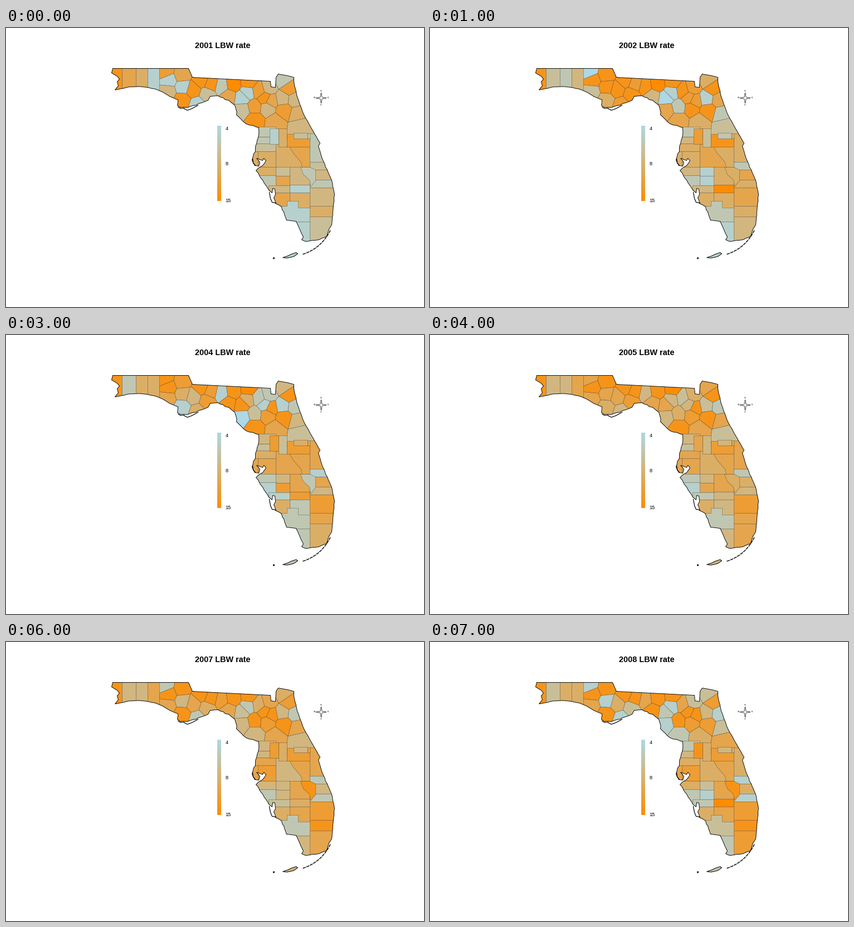
A matplotlib script for the animation above (8000 ms loop, 750x500 px).

```python
import numpy as np
import matplotlib.pyplot as plt
from matplotlib.animation import FuncAnimation
from matplotlib.collections import PolyCollection
from matplotlib.colors import LinearSegmentedColormap
from matplotlib.patches import PathPatch, Polygon
from matplotlib.path import Path

W, H, DPI = 750, 500, 100
FIRST_YEAR, YEARS = 2001, 8
SURVEYS = [0, 1, 2, 3, 5, 7]  # years with a given rate, the others lie between
RAMP = LinearSegmentedColormap.from_list("rate", ["#ADD8E6", "#FF8C00"])
STEPS = RAMP(np.linspace(0, 1, 10))
rng = np.random.default_rng(4)

fig = plt.figure(figsize=(W / DPI, H / DPI), dpi=DPI, facecolor="white")
ax = fig.add_axes([0, 0, 1, 1])
ax.axis("off")


def pt(px):
    return px * 72 / DPI


def label(x, y, text, size, **kw):
    return ax.text(x, y, text, fontsize=pt(size), family="Liberation Sans", **kw)


def stroke(points, width=1.0, **kw):
    ax.plot(*np.transpose(points), color="black", lw=pt(width), **kw)


def coast(points, wiggle):
    """Key points joined by lines with a little seeded roughness."""
    points = np.array(points, float)
    parts = []
    for a, b in zip(points, points[1:]):
        n = max(1, int(np.hypot(*(b - a)) / 5))
        part = a + (b - a) * np.arange(n)[:, None] / n
        part[1:] += rng.normal(0, wiggle, (n - 1, 2))
        parts.append(part)
    return np.vstack(parts)


# State outline, clockwise from the north-west corner
BORDER = [(191, 72), (327, 72), (334, 88), (474, 95), (475, 105), (483, 106),
          (484, 88), (488, 82), (505, 85), (516, 88), (516, 96)]
ATLANTIC = [(516, 96), (518, 106), (522, 123), (533, 153), (553, 189),
            (563, 206), (560, 211), (567, 234), (584, 273), (589, 298),
            (585, 340), (584, 352), (579, 360), (575, 373), (561, 379),
            (537, 382), (530, 379), (533, 374), (520, 346), (503, 344)]
GULF = [(503, 344), (494, 320), (483, 314), (480, 304), (483, 298), (482, 288),
        (478, 287), (477, 295), (471, 290), (448, 255), (453, 250), (460, 246),
        (466, 237), (462, 233), (460, 237), (449, 233), (455, 241), (453, 247),
        (446, 246), (441, 236), (452, 196), (453, 178), (430, 171), (413, 155),
        (410, 138), (399, 129), (380, 121), (366, 122), (362, 129), (340, 138),
        (325, 142), (312, 142), (307, 138), (308, 128)]
BEACH = [(308, 128), (293, 122), (280, 114), (268, 109), (254, 106), (240, 104.5),
         (222, 105), (195, 110.5), (201, 103), (199, 96), (203, 91), (199, 86),
         (189, 80), (191, 72)]
outline = np.vstack([coast(BORDER, 0), coast(ATLANTIC, 0.2), coast(GULF, 0.6),
                     coast(BEACH, 0.2)])
mainland = Path(np.vstack([outline, outline[:1]]))

shapes, rates = [], []


def county(steps, points):
    """Add one county; steps holds a colour step (0-9) per survey."""
    shapes.append(np.array(points, float))
    known = [int(d) for d in steps]
    rates.append(np.rint(np.interp(range(YEARS), SURVEYS, known)).astype(int))


def rect(steps, x0, y0, x1, y1):
    county(steps, [(x0, y0), (x1, y0), (x1, y1), (x0, y1)])


def row(y0, y1, edges, *steps):
    for s, x0, x1 in zip(steps, edges, edges[1:]):
        rect(s, x0, y0, x1, y1)


def column(x0, x1, edges, *steps):
    for s, y0, y1 in zip(steps, edges, edges[1:]):
        rect(s, x0, y0, x1, y1)


def nearest_area(seed, others):
    """The part of the north that lies closer to seed than to the others."""
    area = [np.array(p) for p in ((270, 60), (600, 60), (600, 200), (270, 200))]
    for other in others:
        normal, middle = other - seed, (other + seed) / 2
        kept = []
        for a, b in zip(area, area[1:] + area[:1]):
            da, db = (a - middle) @ normal, (b - middle) @ normal
            if da <= 0:
                kept.append(a)
            if da * db < 0:
                kept.append(a + (b - a) * da / (da - db))
        area = kept
    return area


# Northern counties grow around their centres
NORTH = [
    (286, 78, "708841"), (292, 93, "188888"), (290, 113, "437656"),
    (315, 84, "688788"), (317, 105, "188571"), (316, 128, "851198"),
    (335, 110, "888475"), (343, 137, "178521"), (350, 93, "888888"),
    (361, 118, "388773"), (368, 100, "876788"), (386, 104, "281186"),
    (407, 101, "998888"), (399, 121, "642858"), (435, 97, "882998"),
    (433, 115, "116541"), (423, 125, "109842"), (424, 146, "368081"),
    (446, 141, "724378"), (453, 112, "788246"), (471, 107, "476283"),
    (464, 125, "871188"), (475, 130, "676888"), (497, 93, "256473"),
    (507, 108, "788877"), (496, 126, "412154"), (517, 128, "466221"),
    (499, 147, "786887"), (522, 153, "522483"), (468, 143, "487777"),
    (446, 163, "861872"), (483, 168, "654665"), (527, 175, "434336")]
centres = np.array([c[:2] for c in NORTH], float)
for i, (_, _, steps) in enumerate(NORTH):
    county(steps, nearest_area(centres[i], np.delete(centres, i, axis=0)))

# The west and the peninsula are mostly blocks; later ones lie on top
row(66, 116, [185, 208, 233, 254, 275], "888888", "632253", "523535", "147585")
rect("653666", 504, 212, 545, 250)
county("564645", [(484, 207), (508, 212), (515, 224), (529, 240), (531, 250),
                  (484, 250)])
column(436, 484, [177, 195, 207, 221], "223452", "241334", "353565")
row(221, 249, [436, 452, 484], "554666", "556677")
row(180, 208, [473, 489], "179768")
row(180, 213, [489, 504], "536355")
rect("788777", 504, 190, 545, 213)
rect("325534", 516, 188, 541, 198)
column(545, 600, [189, 240, 254, 272, 286, 319, 338, 392],
       "254675", "327121", "465645", "252431", "466777", "556678", "346567")
rect("254675", 541, 189, 545.5, 198)
column(509, 545, [249, 281, 295, 323], "452666", "192719", "553276")
column(484, 509, [249, 265, 282], "313453", "615761")
column(436, 484, [249, 264, 297], "545235", "225112")
county("252288", [(528, 249), (545, 249), (555, 254), (555, 273), (546, 284),
                  (544, 272), (533, 262)])
rect("444142", 471, 282, 509, 295)
rect("654555", 465, 295, 509, 320)
county("121223", [(485, 319), (504, 319), (504, 310), (524, 310), (524, 322),
                  (545, 322), (545, 347), (485, 347)])
rect("111272", 515, 347, 545, 392)
rates = np.array(rates)

clip = PathPatch(mainland, fc="none", ec="none")
ax.add_patch(clip)
counties = PolyCollection(shapes, edgecolors=(0, 0, 0, 0.5), linewidths=0.35)
counties.set_snap(False)
ax.add_collection(counties)
counties.set_clip_path(clip)
ax.add_patch(PathPatch(mainland, fc="none", ec="black", lw=pt(0.9), snap=False))

# Barrier islands
stroke([(308, 141), (313, 144), (319, 143)])
stroke([(319, 144), (325, 147), (333, 144), (344, 138)], 1.2)
stroke([(472, 294), (474, 305), (477, 312), (484, 313)], 1.2)
stroke([(442, 234), (443, 241), (447, 246)], 1.2)

# Keys: filled western islands, then a broken arc up to the mainland
WEST_KEYS = [(496, 411), (505, 408), (511, 405), (520, 402), (523, 404),
             (516, 409), (508, 411), (496, 411)]
keys = [Polygon(coast(WEST_KEYS, 0.7), ec="black", lw=pt(1)),
        Polygon([(478, 410), (480, 410), (480, 412), (478, 412)], ec="black",
                lw=pt(1))]
for key in keys:
    ax.add_patch(key)
t = np.linspace(0, 1, 30)[:, None]
start, bend, end = np.array([(532, 405), (566, 394), (582, 361)])
stroke((1 - t) ** 2 * start + 2 * t * (1 - t) * bend + t ** 2 * end, 1.4,
       dashes=(4, 0.9), dash_capstyle="butt")

# Legend
ax.imshow(np.linspace(0, 1, 135)[:, None], cmap=RAMP, aspect="auto",
          extent=(378.5, 385.5, 309.5, 174.5), interpolation="nearest")
for y, text in ((182.5, "4"), (246, "8"), (311, "15")):
    label(393, y, text, 9.3)

# Compass: an open four-pointed star
CENTRE = np.array([565, 125])
angles = np.arange(8) * np.pi / 4
rays = np.column_stack([np.cos(angles), np.sin(angles)])
radii = np.tile([9.5, 2.2], 4)[:, None]
ax.add_patch(Polygon(CENTRE + radii * rays, fc="white", ec="black", lw=pt(0.7)))
for name, ray in zip("ESWN", rays[::2]):
    label(*(CENTRE + 12.2 * ray), name, 3.6, ha="center", va="center")

title = label(388.5, 35, "", 14.4, weight="bold", ha="center")
ax.set_xlim(-0.5, W - 0.5)
ax.set_ylim(H - 0.5, -0.5)


def draw(i):
    colors = STEPS[rates[:, i]]
    counties.set_facecolor(colors)
    for key in keys:
        key.set_facecolor(colors[-1])
    title.set_text(f"{FIRST_YEAR + i} LBW rate")
    return [counties, title, *keys]


anim = FuncAnimation(fig, draw, frames=YEARS, interval=1000, repeat=True,
                     repeat_delay=0)
plt.show()
```
